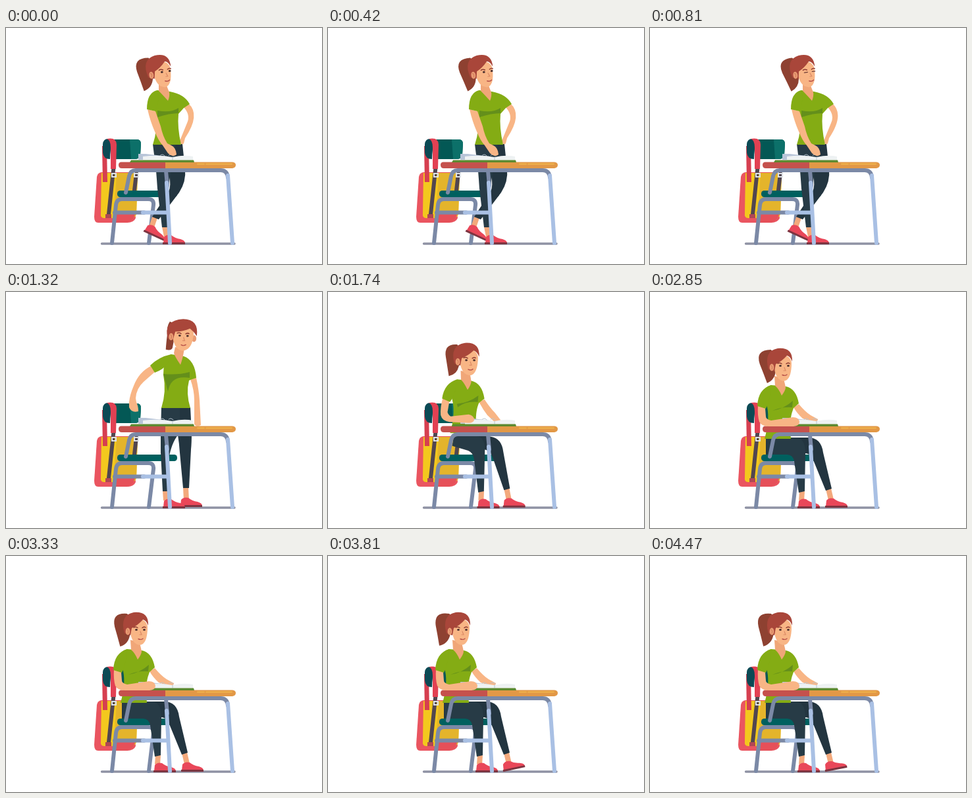
Write an HTML page that moves like this. It is 480 px wide and 360 px high and loops after 4500 ms.

```html
<!DOCTYPE html>
<html lang="en">
<head>
<meta charset="utf-8">
<title>Student at a desk</title>
<style>
html, body { margin: 0; width: 100%; height: 100%; overflow: hidden; background: #fff; }
svg { display: block; width: 100vw; height: 100vh; }
.skin { fill: #f8b585; }
.ear { fill: #e99c74; }
.hair { fill: #a9463a; }
.shirt { fill: #84ac14; }
.tube { fill: none; stroke: #7b89a6; stroke-width: 6; stroke-linecap: round; stroke-linejoin: round; }
.light { stroke: #a9c0e4; }
.ankle { fill: none; stroke: #f3a97c; stroke-width: 8; }
.line { fill: none; stroke-linecap: round; }
</style>
</head>
<body>
<svg viewBox="0 0 480 360">
  <defs>
    <g id="shoe">
      <path fill="#e94759" d="M0-1L1-10Q5-15 12-13Q18-8 26-7Q33-5 33-1Z"/>
      <path fill="#7d3440" d="M-1-2H33V1H-1Z"/>
    </g>
  </defs>

  <path class="line" stroke="#8f92a4" stroke-width="3.4" d="M145.500 329H347"/>

  <g id="pack">
    <path fill="#ea5560" d="M145 220H190L197 290Q194 297 184 297H140Q134 297 134 288L138 227Q139 221 145 220Z"/>
    <path fill="#f3c81e" d="M145 221H200L198 284Q196 290 188 290H149Q143 290 144 282Z"/>
    <path fill="#e4b42b" d="M168 221H200L198 284Q196 290 188 290H164Z"/>
    <path fill="#e65059" d="M168 279H197Q195 296 182 297H164Z"/>
    <path class="line" stroke="#514650" stroke-width="6" d="M164 208L156 284M198 222L194 256"/>
    <path fill="#b04753" d="M151 284H160V290H151Z"/>
    <path class="line" stroke="#dfe3e8" stroke-width="2" d="M161 222H167V227H161ZM195 222H201V227H195Z"/>
  </g>
  <path fill="#d63f50" d="M146 180H153L154 235H147Z"/>
  <path fill="#035855" d="M156 170H199Q205 170 205 177L204 193Q203 200 196 200H160Z"/>
  <path fill="#0c7069" d="M188 170H199Q205 170 205 177L204 193Q203 200 196 200H190Z"/>
  <path fill="#0b4a55" d="M147 177Q148 169 155 169Q160 170 159 178L158 200Q148 200 147 190Z"/>
  <path fill="#e24153" d="M153 169Q168 166 168 178L167 215H159V182Q159 171 153 169Z"/>
  <path class="tube" d="M161 328L167 270Q168 261 176 261H216Q225 261 224 270L217 328"/>
  <rect x="169" y="248" width="91" height="10" rx="4.5" fill="#00605f"/>

  <path id="farAnkle" class="ankle"/>
  <use id="farShoe" href="#shoe"/>
  <path id="farLeg" fill="#233540"/>
  <path id="nearAnkle" class="ankle"/>
  <use id="nearShoe" href="#shoe"/>
  <path id="nearLeg" fill="#273b46"/>
  <path id="rightArm" class="skin"/>
  <path id="torso" class="shirt"/>
  <path id="bust" fill="#648f1b"/>
  <path id="neck" fill="#f0a678"/>

  <g id="head">
    <path id="pony" fill="#8e4131"/>
    <ellipse id="ear" class="ear" cy="116" rx="3.5" ry="5"/>
    <path id="face" class="skin"/>
    <path id="fringe" class="hair"/>
    <ellipse class="ear" cx="185" cy="115" rx="3.4" ry="5.4"/>
    <path class="line" stroke="#cf7758" stroke-width="1" d="M184 112Q187 114 185 118"/>
    <g id="features">
      <path class="line" stroke="#8c3a32" stroke-width="1.5" d="M194 109Q197 107.500 200 109.500M207 109.500Q210 107.500 212 109"/>
      <g id="eyes" fill="#4a2f2d">
        <ellipse cx="198" cy="112.5" rx="1.9" ry="1.5"/>
        <ellipse cx="210" cy="112.5" rx="1.9" ry="1.5"/>
      </g>
      <path id="lids" class="line" stroke="#6b3a34" stroke-width="1.2" d="M195.500 113H200.500M207.500 113H212"/>
      <path class="line" stroke="#dc8b66" stroke-width="1.2" d="M204 115L206 120H203"/>
      <path class="line" stroke="#b9534a" stroke-width="1.4" d="M201 126.500Q205 128.500 208 126"/>
    </g>
  </g>

  <path class="tube" d="M182 251L187 226Q189 217 197 217H326Q336 217 337 228M243 218L245 240"/>
  <path class="tube light" d="M337 225L344 328M244 236L249 328"/>
  <path class="tube" d="M165 281.500H210"/>
  <path class="tube light" d="M208 281.500H245"/>
  <path fill="#c5514d" d="M176 204.500H243V214H176Q171 214 171 209T176 204.500Z"/>
  <path fill="#e29846" d="M242 204.500H344Q349 205 349 209T344 214H242Z"/>
  <path class="line" stroke="#f0b44c" stroke-width="2" d="M291 207.500H301M304 207.500H343"/>
  <path fill="#b8c5d8" d="M201 192H212L246 196V201H201Z"/>
  <path fill="#eef2f3" d="M208 196Q232 193 253 197Q270 193 284 196V202H208Z"/>
  <path class="line" stroke="#b8c5d0" stroke-width="1" d="M253 197V201M234 194.500Q238 191 241 195M247 194.500Q250 191 254 195"/>
  <path fill="#5d8a30" d="M190 201.500H285L286 205H188Z"/>

  <path id="leftArm" class="skin"/>
  <path id="sleeve" class="shirt"/>
</svg>
<script>
const LOOP = 4500;
const $ = id => document.getElementById(id);

// Each part: leaning, turned to the front, seated
const parts = {
  farLeg: [
    "M268 177L272 215Q274 234 263 251L232 292L222 288L247 250Q251 240 248 225L236 177Z",
    "M280 176L282 215Q282 230 281 240L278 299L269 299L264 245Q263 230 261 218L245 176Z",
    "M176 222L240 222Q260 222 263 245L276 300L267 303L247 254Q243 246 235 246L176 248Z"],
  nearLeg: [
    "M258 177L251 215Q248 230 247 245L246 304L237 304L230 245Q229 230 228 218L223 177Z",
    "M264 176L264 215Q253 226 248 250L245 304L238 304L235 245Q235 230 235 215L236 176Z",
    "M176 222L222 222Q236 224 236 245L235 304L226 306L219 258Q217 248 208 248L178 248Z"],
  farAnkle: ["M226 289L221 304", "M273 298L274 318", "M271 300L275 317"],
  nearAnkle: ["M241 303L244 318", "M242 303L243 318", "M231 304L230 318"],
  rightArm: [
    "M269 120Q281 132 275 145L264 172Q266 180 270 176L272 168Q296 132 277 115Z",
    "M280 133Q286 150 286 165L286 202Q290 207 296 203L294 165Q293 150 289 131Z",
    "M218 176Q224 186 232 193L246 198Q256 198 255 194L244 188Q236 183 226 171Z"],
  torso: [
    "M230 95Q220 98 219 108L227 128Q231 155 223 178L266 178Q260 152 262 131L270 122L279 116Q271 101 249 97Z",
    "M251 95Q243 98 240 108L239 126Q244 152 236 177L280 177Q273 154 278 135L280 134L289 131Q287 104 270 98Z",
    "M184 142Q174 145 172 156L178 176Q182 195 174 224L214 224Q211 195 217 180L218 177L226 170Q222 147 206 144Z"],
  bust: [
    "M230 126Q250 130 262 122L262 130Q248 130 230 136Z",
    "M239 125Q262 127 279 122L279 131Q250 126 246 152Z",
    "M186 181Q204 178 217 166L216 176Q200 175 186 181Z"],
  neck: [
    "M232 86L232 96Q238 102 246 111Q249 104 248 98L244 88Z",
    "M257 84L255 93Q256 98 265 111Q268 102 269 97L271 86Z",
    "M189 128L190 143Q196 148 200 158Q206 150 206 145L203 132Z"],
  leftArm: [
    "M215 124Q219 142 226 158Q231 171 238 179L246 191Q254 198 259 193Q258 182 251 179L245 176Q238 165 235 150L227 127Z",
    "M220 113Q202 122 194 143Q188 157 187 168L187 176Q191 185 201 182Q201 174 198 168L197 162Q198 147 209 137L226 122Z",
    "M164 173Q163 188 166 198Q170 206 184 205L218 205Q227 204 227 198Q226 191 217 191L184 196Q176 194 176 190L175 177Z"],
  sleeve: [
    "M230 95Q214 98 214 124L227 127Q231 115 232 106Z",
    "M251 95Q232 99 219 112L226 123Q240 118 246 108Z",
    "M184 142Q164 148 163 174L176 178Q180 170 182 158Z"]
};

// Head parts: three-quarter view, front view
const headParts = {
  pony: [
    "M184 88Q160 86 165 108Q169 122 173 138Q186 134 188 120Q192 108 190 96Z",
    "M182 92Q177 100 179 112Q178 126 178 135Q186 137 188 132Q191 112 190 96Z"],
  face: [
    "M188 104Q188 96 200 96Q213 96 215 108Q215 128 208 134Q203 138 196 133Q188 126 188 104Z",
    "M186 104Q188 96 202 96Q219 96 219 110Q218 128 210 133Q203 138 195 132Q187 124 186 104Z"],
  fringe: [
    "M180 118Q172 90 194 86Q217 84 216 106Q213 98 208 97Q200 106 191 110L189 121Z",
    "M180 118Q172 90 202 87Q226 86 224 112Q220 106 213 101Q203 106 191 107L188 120Z"]
};
for (const [id, [side, front]] of Object.entries(headParts)) parts[id] = [side, front, side];

// x, y, angle per pose
const places = {
  head: [[35, -45, -8], [66, -46, 3], [0, 0, 0]],
  farShoe: [[210, 310, 25], [265, 327, 0], [267, 328, 0]],
  nearShoe: [[239, 329, 0], [239, 329, 0], [225, 329, 0]]
};

// [time, value] steps
const tracks = {
  pose: [[0, 0], [950, 0], [1250, 1], [1320, 1], [1900, 2]],
  pony: [[0, 3], [810, -3], [1150, 0], [1900, 4], [2160, 0], [2850, -6], [3810, 5], [4500, 1]],
  pack: [[0, 0], [1800, 0], [2130, 6], [2450, 0]],
  toe: [[0, 0], [3600, 0], [3780, -12], [3990, -12], [4140, 0], [4260, 0], [4410, -11]],
  blink: [[0, 0], [710, 0], [770, 1], [860, 1], [920, 0]]
};

const lerp = (a, b, k) => a + (b - a) * k;
const ease = k => k * k * (3 - 2 * k);

function at(track, t) {
  const i = track.findIndex(step => step[0] > t);
  if (i < 0) return track[track.length - 1][1];
  const [t0, a] = track[i - 1], [t1, b] = track[i];
  return lerp(a, b, ease((t - t0) / (t1 - t0)));
}

function mixPath(a, b, k) {
  const to = b.match(/-?[\d.]+/g);
  let i = 0;
  return a.replace(/-?[\d.]+/g, n => lerp(+n, +to[i++], k).toFixed(2));
}

function draw(t) {
  const pose = at(tracks.pose, t), from = Math.min(1, Math.floor(pose)), k = pose - from;
  const set = (id, name, value) => $(id).setAttribute(name, value);

  for (const id in parts) set(id, "d", mixPath(parts[id][from], parts[id][from + 1], k));

  const place = id => places[id][from].map((v, i) => lerp(v, places[id][from + 1][i], k));
  const [hx, hy, tilt] = place("head");
  set("head", "transform", `translate(${hx} ${hy}) rotate(${tilt} 200 110)`);
  for (const id of ["farShoe", "nearShoe"]) {
    const [x, y, turn] = place(id);
    const tap = id === "farShoe" ? at(tracks.toe, t) : 0;
    set(id, "transform", `translate(${x} ${y}) rotate(${turn + tap})`);
  }

  const front = 1 - Math.abs(pose - 1);
  set("ear", "cx", lerp(208, 220, front));
  set("features", "transform", `translate(${Math.max(0, 1 - pose) * 3.5} 0)`);
  set("pony", "transform", `rotate(${at(tracks.pony, t) * (1 - front)} 184 92)`);
  set("pack", "transform", `translate(0 ${at(tracks.pack, t)})`);

  const shut = at(tracks.blink, t);
  set("eyes", "opacity", 1 - shut);
  set("lids", "opacity", shut);
}

function tick() {
  draw(performance.now() % LOOP);
  requestAnimationFrame(tick);
}
tick();
</script>
</body>
</html>
```
